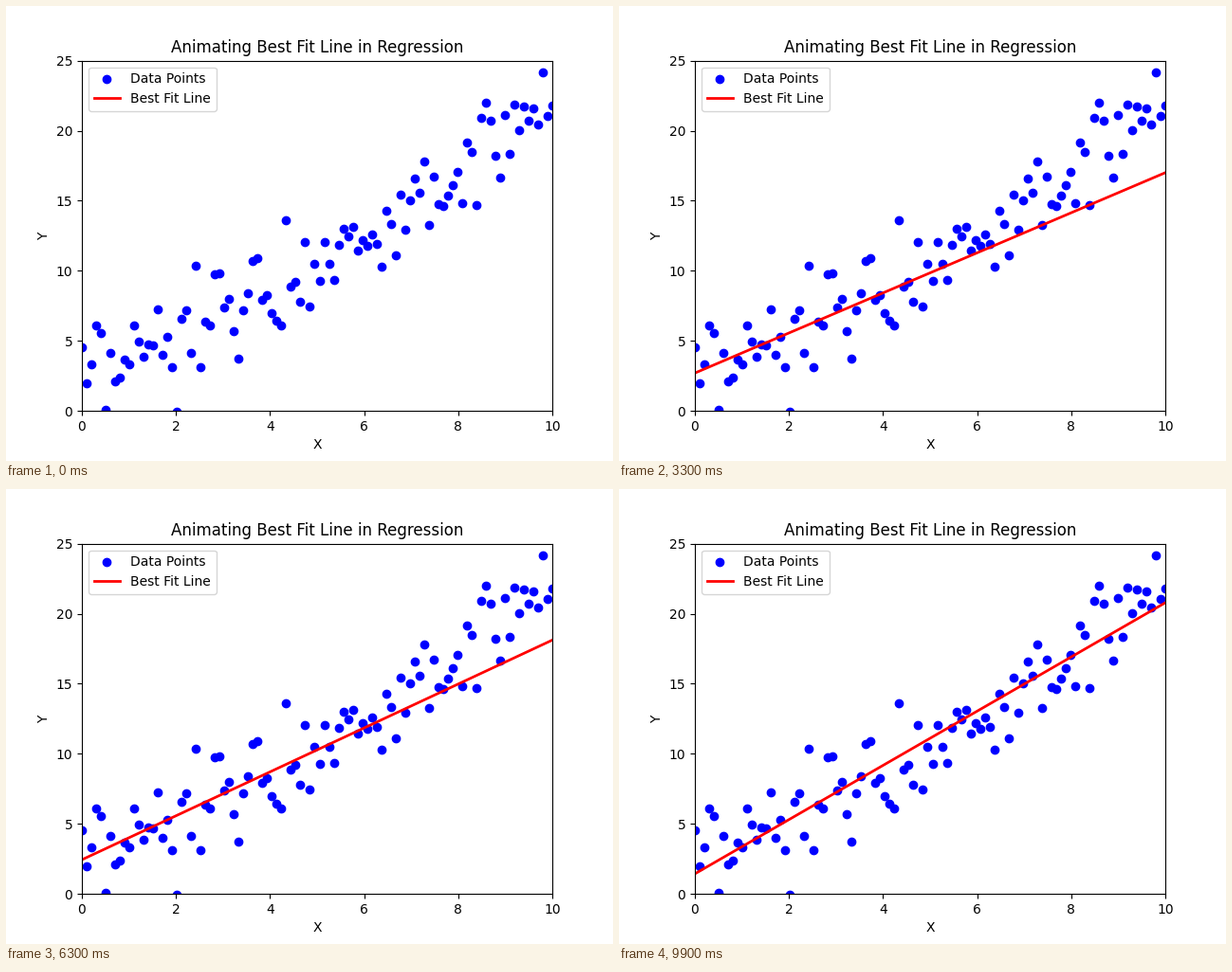
Animation of 640 by 480 pixels, one loop 10 s. Source, as a matplotlib script:

```python
import numpy as np
import matplotlib.pyplot as plt
from matplotlib.animation import FuncAnimation

FRAMES = 100

np.random.seed(0)
x = np.linspace(0, 10, FRAMES)
y = 2 * x + 1 + 2 * np.random.randn(FRAMES)

fig, ax = plt.subplots(figsize=(6.4, 4.8), dpi=100)
ax.scatter(x, y, color="blue", label="Data Points")
(line,) = ax.plot([], [], color="red", lw=2, label="Best Fit Line")
ax.set(
    xlim=(0, 10),
    ylim=(0, 25),
    xlabel="X",
    ylabel="Y",
    title="Animating Best Fit Line in Regression",
)
ax.legend(loc="upper left")


def init():
    line.set_data([], [])
    return (line,)


def update(n):
    """Fit a line through the first n points; two are needed to start."""
    if n < 2:
        return init()
    slope, intercept = np.polyfit(x[:n], y[:n], 1)
    line.set_data(x, slope * x + intercept)
    return (line,)


anim = FuncAnimation(
    fig, update, frames=FRAMES, init_func=init, interval=100, repeat=True, repeat_delay=0
)

plt.show()
```
